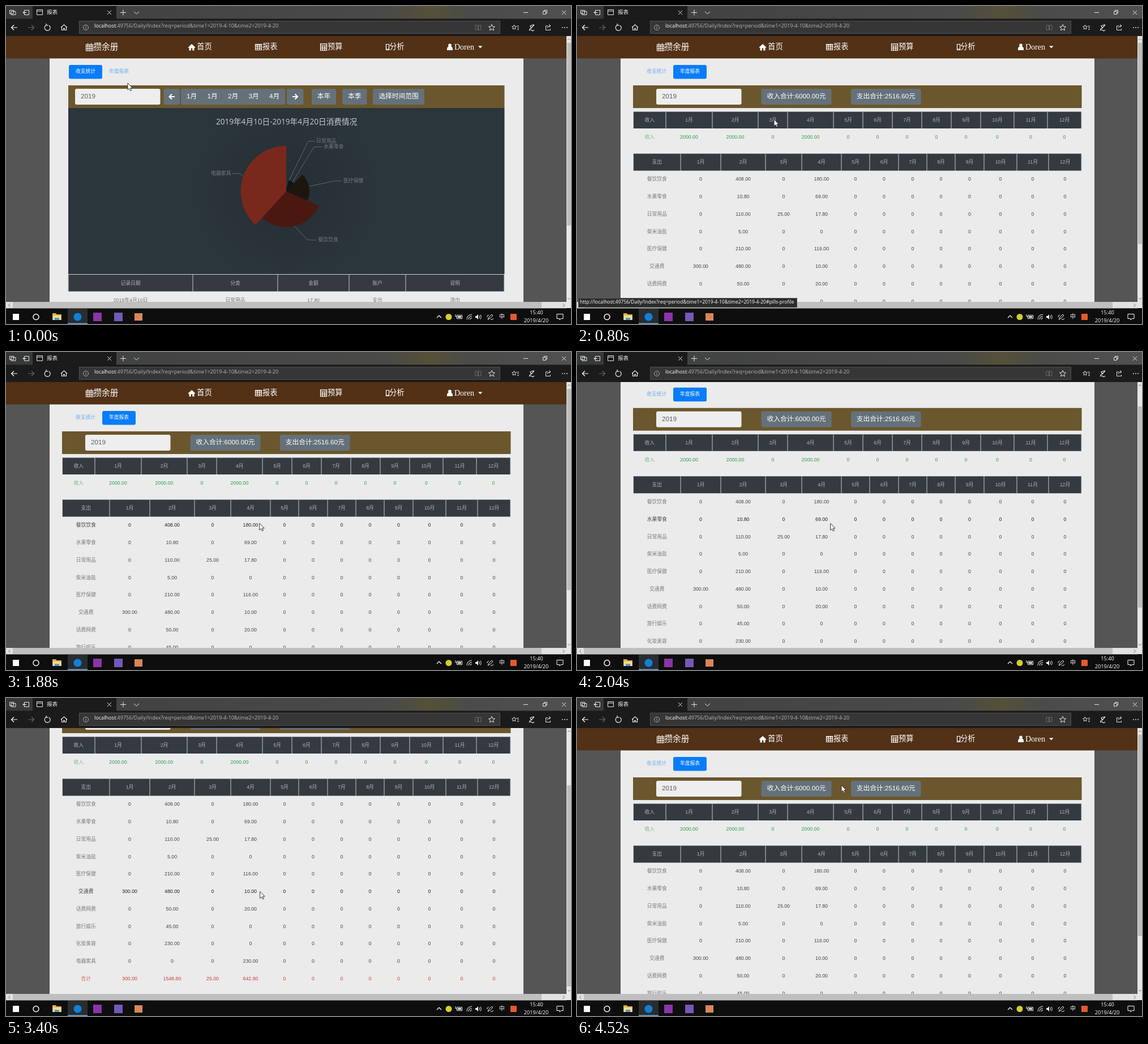
Recreate the animation shown at these times as an HTML page with a canvas. Size 998 by 561 pixels, loop 4.56 s.

```html
<!DOCTYPE html>
<html lang="zh-CN">
<head>
<meta charset="utf-8">
<title>报表</title>
<style>
html, body { margin: 0; width: 100%; height: 100%; overflow: hidden; background: #0e0e0e; }
canvas { display: block; }
</style>
</head>
<body>
<canvas id="stage" width="998" height="561"></canvas>
<script>
const g = document.getElementById('stage').getContext('2d');
const LOOP = 4560, SWITCH = 560, SCROLL = 118;
const SANS = '"Liberation Sans", "Noto Sans CJK SC", "Noto Sans CJK", sans-serif';
const UI = '"Open Sans", "Noto Sans CJK SC", "Noto Sans CJK", sans-serif';
const SERIF = '"Liberation Serif", serif';
const HEAD = '#343a40', BTN = '#65717a', GOLD = '#6b572d', SMALL = 8.8;
const URL_REST = ':49756/Daily/Index?req=period&time1=2019-4-10&time2=2019-4-20';

// Cursor path: time, x, y
const PATH = [[0, 215, 136], [300, 209, 119], [520, 209, 119], [800, 348, 200], [1200, 432, 290],
  [1600, 448, 302], [2900, 447, 303], [3320, 448, 340], [3440, 449, 342], [3600, 451, 396],
  [3940, 452, 390], [4520, 467, 154], [4560, 467, 150]];

const MONTHS = Array.from({ length: 12 }, (_, i) => i + 1 + '月');
const INCOME_X = [99.5, 157, 239, 320, 372, 453, 505, 557, 609, 661, 713, 772, 831, 891];
const SPEND_X = [99.5, 183, 254, 333, 397, 467, 517, 568, 618, 668, 719, 777, 833, 891];
const RECORD_X = [110, 330, 480, 606, 706, 880];
const ROW_H = 30.75, ROW_TOP = 290.5;
const SPEND = [
  ['餐饮饮食', '0', '408.00', '0', '180.00'],
  ['水果零食', '0', '10.80', '0', '69.00'],
  ['日常用品', '0', '110.00', '25.00', '17.80'],
  ['柴米油盐', '0', '5.00', '0', '0'],
  ['医疗保健', '0', '210.00', '0', '116.00'],
  ['交通费', '300.00', '480.00', '0', '10.00'],
  ['话费网费', '0', '50.00', '0', '20.00'],
  ['旅行娱乐', '0', '45.00', '0', '0'],
  ['化妆美容', '0', '230.00', '0', '0'],
  ['电器家具', '0', '0', '0', '230.00'],
  ['合计', '300.00', '1548.80', '25.00', '642.80'],
];

function rect(x, y, w, h, color, r = 0) {
  g.fillStyle = color;
  g.beginPath();
  g.roundRect(x, y, w, h, r);
  g.fill();
}
function text(s, x, y, size, color, align = 'center', font = SANS) {
  g.font = `${size}px ${font}`;
  g.fillStyle = color;
  g.textAlign = align;
  g.textBaseline = 'middle';
  g.fillText(s, x, y + 0.5);
  return g.measureText(s).width;
}
function stroke(d, color = '#e4e4e4', w = 1) {
  g.strokeStyle = color;
  g.lineWidth = w;
  g.stroke(new Path2D(d));
}
function fill(d, color = '#f0f0f0') {
  g.fillStyle = color;
  g.fill(new Path2D(d));
}
function dot(x, y, r, color) {
  g.fillStyle = color;
  g.beginPath();
  g.arc(x, y, r, 0, 7);
  g.fill();
}
function button(x, w, label) {
  rect(x, 146, w, 28, BTN, 3);
  if (label) text(label, x + w / 2, 159.5, 11.7, '#fff');
}
function yearInput(x) {
  rect(x, 146, 150.5, 28, '#eeeeee', 3);
  text('2019', x + 10, 159.5, 11.7, '#5a6067', 'left');
}

const clamp = v => Math.max(0, Math.min(1, v));
const ease = (t, a, b) => 1 - (1 - clamp((t - a) / (b - a))) ** 3;
function cursorAt(t) {
  let i = 1;
  while (i < PATH.length - 1 && PATH[i][0] < t) i++;
  const [t0, x0, y0] = PATH[i - 1], [t1, x1, y1] = PATH[i], k = clamp((t - t0) / (t1 - t0));
  return [x0 + (x1 - x0) * k, y0 + (y1 - y0) * k];
}
const scrollAt = t => SCROLL * (ease(t, 2000, 2300) - ease(t, 3420, 3580));

function headRow(xs, y, h, labels) {
  const end = xs[xs.length - 1];
  rect(xs[0], y, end - xs[0], h, HEAD);
  xs.forEach(x => rect(x - 0.5, y, 1, h, '#c3c7ca'));
  labels.forEach((s, i) => text(s, (xs[i] + xs[i + 1]) / 2, y + h / 2, SMALL, '#aeb2b5'));
}
function dataRow(xs, y, cells, color, first = color) {
  for (let i = 0; i < xs.length - 1; i++)
    text(cells[i] || '0', (xs[i] + xs[i + 1]) / 2, y, SMALL, i ? color : first);
}

function nav() {
  rect(0, 53, 990, 39.5, '#523116');
  stroke('M141.5 68h12v11h-12zM141.5 71h12M144.5 68v11M147.5 68v11M150.5 68v11M141.5 75h12M144.5 65.5v4M150.5 65.5v4', '#fff', 1.1);
  text('攒余册', 154.5, 72.5, 14.6, '#fff', 'left');
  fill('M321.5 73l6.5-6 6.5 6-1 1-1-1v5.5h-3.3v-4h-2.4v4h-3.3V73l-1 1z', '#fff');
  text('首页', 337, 72, 13.4, '#fff', 'left');
  stroke('M440.5 67.5h11v10h-11zM440.5 69h11M440.5 71.5h11M440.5 74.5h11M444 68v10M448 68v10', '#fff', 1.1);
  text('报表', 453, 72, 13.2, '#fff', 'left');
  stroke('M555.5 66.5h11v12h-11zM556 69h10M556 72.5h10M556 75.5h10M559 70v8M563 70v8', '#fff', 1.2);
  text('预算', 568, 72, 13.3, '#fff', 'left');
  stroke('M671.5 67.5h5v10h-5zM671.5 76h5', '#fff', 1.2);
  text('分析', 677, 72, 13.3, '#fff', 'left');
  dot(784, 69.5, 2.9, '#fff');
  fill('M779 78v-2q0-4 3-4.5h4q3 .5 3 4.5v2z', '#fff');
  text('Doren', 792, 72.5, 14, '#fff', 'left', SERIF);
  fill('M834 70.5h7.5l-3.75 4z', '#fff');
}

function tabs(second, hover) {
  rect(second ? 170 : 111, 104, 59, 24.5, '#087cf9', 3);
  text('收支统计', 140.5, 115.5, SMALL, second ? '#6fb0ea' : '#fff');
  text('年度报表', 199.5, 115.5, SMALL, second ? '#fff' : hover ? '#5598d2' : '#6fb0ea');
}

function pie() {
  const cx = 495, cy = 327;
  const glow = g.createRadialGradient(cx, cy, 40, cx, cy, 170);
  glow.addColorStop(0, 'rgba(0,0,0,.1)');
  glow.addColorStop(1, 'rgba(0,0,0,0)');
  rect(325, 181, 340, 292, glow);
  // from, to (degrees clockwise from the top), radius, colour
  [[0, 10.7, 6, '#0c1116'], [10.7, 44, 20, '#10151a'], [44, 114, 41, '#1c160f'],
   [114, 222.5, 63, '#4b1811'], [222.5, 360, 80.5, '#79281c']].forEach(([a, b, r, c]) => {
    const rad = d => (d - 90) * Math.PI / 180;
    g.fillStyle = c;
    g.beginPath();
    g.moveTo(cx, cy);
    g.arc(cx, cy, r, rad(a), rad(b));
    g.fill();
  });
  stroke('M500 308L533 240Q534 238.500 537 238.500H546M506 311L543 250Q544.500 248.500 548 248.500H558M536 318L574 310Q580 308.500 584 308.500H593M509 388L531 411Q534 413 538 413H548M418 299Q414 295.500 409 295.500H399', '#5f676e');
  const label = (s, x, y, align = 'left') => text(s, x, y, 8.9, '#757c82', align);
  label('日常用品', 548, 238.5);
  label('水果零食', 561, 248.5);
  label('医疗保健', 596, 308.5);
  label('餐饮饮食', 551.5, 412.5);
  label('电器家具', 397.5, 295.5, 'right');
}

function periodPage() {
  rect(110, 140, 770.5, 40, GOLD);
  yearInput(122);
  button(278.5, 28.5);
  button(309, 184);
  button(496, 29.5);
  stroke('M298 160h-9M293 155.500l-4.500 4.500 4.500 4.500', '#fff', 2);
  stroke('M506 160h9M510.500 155.500l4.500 4.500-4.500 4.500', '#fff', 2);
  ['1月', '1月', '2月', '3月', '4月'].forEach((s, i) => text(s, 328 + i * 36.5, 159.5, 11.7, '#fff'));
  button(540, 43, '本年');
  button(594, 43.5, '本季');
  button(648, 91, '选择时间范围');
  rect(110, 180, 770.5, 293, '#2b353c');
  text('2019年4月10日-2019年4月20日消费情况', 495.5, 204.5, 13.6, '#cdd0d2', 'center', UI);
  pie();
  rect(110, 473, 770.5, 1, '#d0d2d4');
  headRow(RECORD_X, 474, 29.5, ['记录日期', '分类', '金额', '账户', '说明']);
  dataRow(RECORD_X, 519.5, ['2019年4月10日', '日常用品', '17.80', '支出', '湿巾'], '#777');
}

function yearPage(hover) {
  rect(99, 140, 792.5, 40, GOLD);
  yearInput(140);
  button(325.5, 124, '收入合计:6000.00元');
  button(484, 123.5, '支出合计:2516.60元');
  headRow(INCOME_X, 186.5, 29.5, ['收入', ...MONTHS]);
  dataRow(INCOME_X, 231.5, ['收入', '2000.00', '2000.00', '0', '2000.00'], '#2fa04c', '#72bd86');
  headRow(SPEND_X, 260.5, 30, ['支出', ...MONTHS]);
  SPEND.forEach((row, i) => {
    const y = 305.5 + i * ROW_H;
    if (i === 10) dataRow(SPEND_X, y, row, '#c4453b', '#cd6c63');
    else if (i === hover) dataRow(SPEND_X, y, row, '#222', '#444');
    else dataRow(SPEND_X, y, row, '#484848', '#7a7a7a');
  });
}

function page(t, hover) {
  const second = t >= SWITCH, y = scrollAt(t);
  g.save();
  g.beginPath();
  g.rect(0, 53, 990, 469);
  g.clip();
  rect(0, 53, 990, 469, '#555');
  rect(77, 53, 837, 469, '#ebebeb');
  g.translate(0, -y);
  nav();
  tabs(second, t > 200);
  if (second) {
    g.globalAlpha = clamp((t - SWITCH + 40) / 150);
    yearPage(hover);
  } else periodPage();
  g.restore();

  rect(990, 53, 8, 480, '#e6e6e6');
  rect(991, 65 + y * 0.755, 7, second ? 355 : 322, '#bebebe');
  stroke('M992 60l2.500-2.500 2.500 2.500M992 515l2.500 2.500 2.500-2.500', '#777');
  rect(0, 522, 990, 11.5, '#e2e2e2');
  rect(12, 522, 934, 11.5, '#bfbfbf');
  stroke('M7.500 525l-3 3 3 3M983.500 525l3 3-3 3', '#777');
}

function browser() {
  const bar = g.createLinearGradient(0, 0, 998, 0);
  bar.addColorStop(0, '#363838');
  bar.addColorStop(0.2, '#414343');
  bar.addColorStop(0.68, '#4a4a48');
  bar.addColorStop(0.75, '#555038');
  bar.addColorStop(0.82, '#4b4b49');
  bar.addColorStop(1, '#505050');
  rect(0, 0, 998, 23, bar);
  rect(47, 0, 148, 23, '#1b1b1b');
  rect(0, 22.5, 998, 30.5, '#1b1b1b');
  rect(129, 26, 744, 23, '#363636');
  stroke('M129.500 26.500h743v22h-743z', '#505050');
  stroke('M6.500 7.500h7v6h-7zM9 9.500h8v6h-8zM32.500 7.500h8v8h-8zM30 11.500h6M32 9.500l-2 2 2 2');
  stroke('M54.500 6.500h10v9h-10zM54.500 9h10');
  text('报表', 72, 10.5, 9.6, '#eee', 'left');
  stroke('M179 8l7 7M186 8l-7 7M202 11.500h10M207 6.500v10M226 10l4.500 4 4.500-4');
  stroke('M914 11.500h8M948.500 9.500h5v5h-5zM950.500 9v-1.500h5v5h-1.500M982 8l7 7M989 8l-7 7');
  stroke('M20 38H10M14 33.500L9.500 38l4.500 4.500', '#fff', 1.2);
  stroke('M39 38h10M45 33.500l4.500 4.500-4.500 4.500', '#666', 1.2);
  stroke('M71 33.800a5 5 0 1 0 5 .4M71 31v3.200h3.500', '#eee', 1.2);
  stroke('M97 38l5.500-5 5.500 5M98.500 37v5.500h3v-3h2v3h3V37', '#eee', 1.1);
  stroke('M145.500 38a4.500 4.500 0 1 0-9 0 4.500 4.500 0 1 0 9 0M141 37v3.500M141 35v1', '#aaa');
  const w = text('localhost', 156, 35.5, 9.1, '#fff', 'left', UI);
  text(URL_REST, 156 + w, 35.5, 9.1, '#b4b4b4', 'left', UI);
  stroke('M829 34h4.500v8H829zM834.500 34h4.500v8h-4.500z', '#686868');
  stroke('M858 32.500l1.600 3.700 3.900.3-3 2.600 1 3.900-3.500-2.100-3.500 2.100 1-3.900-3-2.600 3.900-.3z');
  stroke('M902 35.500h4M903 38.500h3M903 41.500h3M897.500 33.500l1.200 2.500 2.600.3-2 1.800.5 2.900-2.300-1.500-2.300 1.500.5-2.900-2-1.800 2.600-.3z');
  stroke('M925 42q0-3 3-3l5-6M928 39l-2-4 6-2M924 43q3-2 5 0t4-1', '#eee', 1.2);
  stroke('M957 35h-3.500v7.500h8V40M956 39q1-4 5-4M959 32.500l3 2.500-3 2.500');
  [983, 987, 991].forEach(x => dot(x, 38, 0.9, '#eee'));
}

function taskbar() {
  rect(0, 533.5, 998, 27.5, '#0e0e0e');
  rect(12, 543, 11, 11, '#fff');
  stroke('M58 548.500a5 5 0 1 0-10 0 5 5 0 1 0 10 0', '#fff', 1.4);
  fill('M82 542h6l1.500 2H98v10H82z', '#e2b04a');
  rect(83, 546, 14, 8, '#f8dc8c');
  rect(86, 550, 8, 4, '#4a9bd8');
  rect(109, 534, 35, 27, '#292d30');
  dot(126.5, 548.5, 7, '#1180d8');
  rect(154, 541, 15, 15, '#8a35a8');
  rect(191, 541, 15, 15, '#7459b8');
  rect(227, 542, 14, 13, '#d98757');
  rect(109, 559.5, 35, 1.5, '#6aa9dc');
  stroke('M761 550l4-4 4 4', '#fff', 1.2);
  dot(782, 548.5, 5.5, '#d6cd28');
  stroke('M796.500 545.500h9v6h-9zM794 544v4h3', '#eee');
  rect(798, 547, 6, 3, '#eee');
  stroke('M814 553q0-8 9-9M817 553q0-5 6-5.500M820 553q0-2 3-2.500', '#ddd', 1.1);
  fill('M829 547h2l3-3v9l-3-3h-2z');
  stroke('M836 546q1.500 2.500 0 5M838 544.500q3 4 0 8');
  stroke('M851 553l2-4 5-5 2 2-5 5zM850 549q-1-3 3-4M856 553q4 1 5-2', '#eee');
  text('中', 876, 548, 10, '#fff');
  rect(891, 543, 11, 11, '#e8592b', 1);
  text('15:40', 937, 541, 9.2, '#fff', 'center', UI);
  text('2019/4/20', 936.5, 555, 9.2, '#fff', 'center', UI);
  stroke('M973 543.500h11v8h-4l-2 2.500v-2.500h-5z', '#fff');
}

function pointer(x, y, hand) {
  g.save();
  g.translate(x, y);
  g.lineJoin = 'round';
  const d = hand
    ? 'M-1 1Q0 -.8 1.500 1V6L6 7.200Q8.500 7.800 8 10.500L7 15.500H0L-4 10.500Q-4.500 8.500-1 10.500Z'
    : 'M0 0V12L2.800 9.500 4.800 13.600 6.700 12.700 4.800 8.700H8.500Z';
  fill(d, '#fff');
  stroke(d, '#222', 0.9);
  if (hand) stroke('M1.500 6v3M3.800 7v2.500M6 7.500v2.500', '#444', 0.7);
  g.restore();
}

function draw(t) {
  const [x, y] = cursorAt(t);
  // Row highlight holds still while the page scrolls back
  const ht = t > 3400 && t < 3700 ? 3400 : t;
  const hover = Math.floor((cursorAt(ht)[1] + scrollAt(ht) - ROW_TOP) / ROW_H);
  page(t, hover);
  browser();
  taskbar();
  if (t >= 240 && t < 1080) {
    rect(2, 515, 387, 16.5, '#2b2b2b');
    stroke('M2.500 515.500h386v16h-386z', '#555');
    text('http://localhost' + URL_REST + '#pills-profile', 5, 522.5, 8.5, '#fff', 'left', UI);
  }
  pointer(x, y, x > 170 && x < 229 && y > 104 && y < 128);
}

function tick() {
  draw(Math.floor(performance.now() % LOOP / 40) * 40);
  requestAnimationFrame(tick);
}
tick();
</script>
</body>
</html>
```
